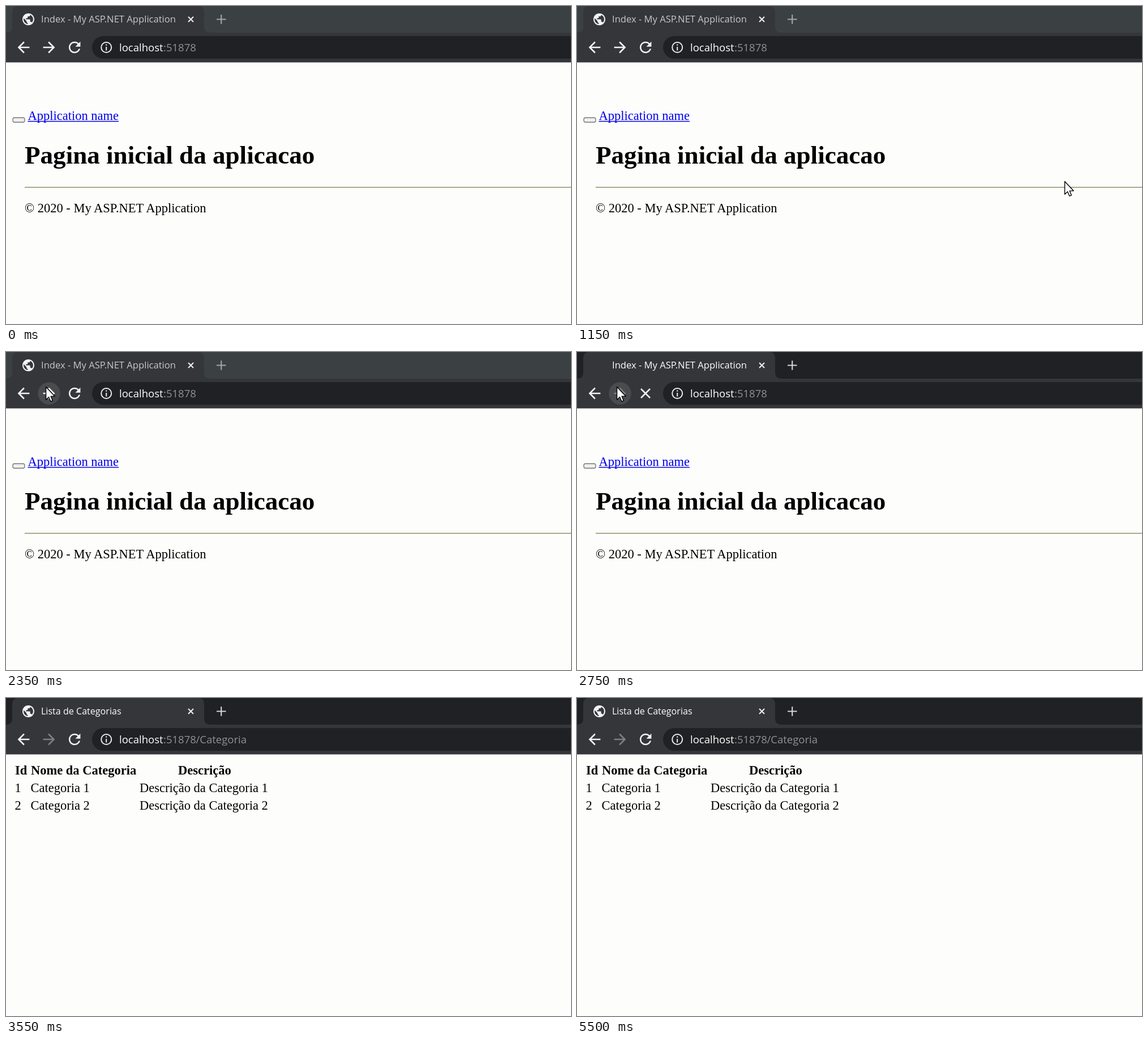
An HTML page for the animation above (5750 ms loop, 998 px wide and 561 px high).

```html
<!DOCTYPE html>
<html lang="pt">
<head>
<meta charset="utf-8">
<title>Browser navigation</title>
<style>
html, body { margin: 0; width: 100%; height: 100%; overflow: hidden; background: #fdfdfc; }
svg { display: block; }
.ui { font-family: "Open Sans", "Noto Sans", sans-serif; }
.doc { font-family: "Liberation Serif", "Times New Roman", serif; font-size: 22.5px; }
.bold { font-weight: bold; }
.heading { font-size: 45.1px; }
.line { fill: none; stroke: currentColor; }
#strip { fill: #3b4143; }
#title { fill: #c6c8ca; }
#plus { color: #a3a6a9; }
.active #strip { fill: #202124; }
.active #title { fill: #fff; }
.active #plus { color: #d3d5d7; }
</style>
</head>
<body>
<svg id="stage" width="998" height="561" viewBox="0 0 998 561">
  <g class="ui">
    <rect id="strip" width="998" height="47"/>
    <path fill="#35363a" d="M0 99.6V47Q11 47 11 36V11Q11 0 22 0H339Q350 0 350 11V36Q350 47 361 47H998V99.6Z"/>
    <path id="globe" fill="#f1f3f4" transform="translate(26.9 10.9) scale(1.05)" d="M12 2C6.48 2 2 6.48 2 12s4.48 10 10 10 10-4.48 10-10S17.52 2 12 2zm-1 17.93c-3.95-.49-7-3.85-7-7.93 0-.62.08-1.21.21-1.79L9 15v1c0 1.1.9 2 2 2v1.93zm6.9-2.54c-.26-.81-1-1.39-1.9-1.39h-1v-3c0-.55-.45-1-1-1H8v-2h2c.55 0 1-.45 1-1V7h2c1.1 0 2-.9 2-2v-.41c2.93 1.19 5 4.06 5 7.41 0 2.08-.8 3.97-2.1 5.39z"/>
    <text id="title" x="62" y="29"></text>
    <path class="line" color="#eceeef" stroke-width="2.1" d="M322 19l9 9m0-9l-9 9"/>
    <path id="plus" class="line" stroke-width="2.1" d="M372 23.5h16.5M380.2 15.3v16.5"/>
    <circle id="hover" cx="76" cy="73" r="19.7" fill="#4a4b4f"/>
    <g fill="#f1f3f4">
      <path transform="translate(15.4 57.4) scale(1.3)" d="M20 11H7.83l5.59-5.59L12 4l-8 8 8 8 1.41-1.41L7.83 13H20z"/>
      <path id="forward" transform="translate(91.6 57.4) scale(-1.3 1.3)" d="M20 11H7.83l5.59-5.59L12 4l-8 8 8 8 1.41-1.41L7.83 13H20z"/>
      <path id="reload" transform="translate(105.8 57.6) scale(1.28)" d="M17.65 6.35C16.2 4.9 14.21 4 12 4c-4.42 0-7.99 3.58-7.99 8s3.57 8 7.99 8c3.73 0 6.84-2.55 7.73-6h-2.08c-.82 2.33-3.04 4-5.65 4-3.31 0-6-2.69-6-6s2.69-6 6-6c1.66 0 3.14.69 4.22 1.78L13 11h7V4z"/>
    </g>
    <path id="stop" class="line" color="#f1f3f4" stroke-width="2.5" d="M113 65l16 16m0-16l-16 16"/>
    <path fill="#202124" d="M998 53H172a20 20 0 0 0 0 40H998Z"/>
    <g class="line" color="#e8eaed" stroke-width="2">
      <circle cx="177.2" cy="73" r="9"/>
      <path d="M177.2 67.5v2.3m0 2.2v6.5"/>
    </g>
    <text y="80" font-size="18.5" fill="#8e9196"><tspan x="200" fill="#fff">localhost</tspan><tspan x="278">:51878</tspan><tspan id="route" x="335.5">/Categoria</tspan></text>
  </g>

  <g id="home" class="doc">
    <rect x="12" y="197" width="21" height="8" rx="3" fill="#efefef" stroke="#767676" stroke-width="1.3"/>
    <text x="38.5" y="201" fill="#0000ee">Application name</text>
    <path d="M38.5 203.5H199" stroke="#0000ee" stroke-width="1.4"/>
    <text class="bold heading" x="33" y="278">Pagina inicial da aplicacao</text>
    <path d="M33 319.5H998" stroke="#96967a"/>
    <path d="M33 320.5H998" stroke="#bcbc9c"/>
    <text x="33" y="364">© 2020 - My ASP.NET Application</text>
  </g>

  <g id="list" class="doc">
    <g class="bold">
      <text x="16" y="135">Id</text>
      <text x="44" y="135">Nome da Categoria</text>
      <text x="304" y="135">Descrição</text>
    </g>
    <text y="166"><tspan x="15.5">1</tspan><tspan x="43.5">Categoria 1</tspan><tspan x="236">Descrição da Categoria 1</tspan></text>
    <text y="197"><tspan x="15.5">2</tspan><tspan x="43.5">Categoria 2</tspan><tspan x="236">Descrição da Categoria 2</tspan></text>
  </g>

  <path id="cursor" fill="#fff" stroke="#000" stroke-linejoin="round" d="M.4.4V16.6L4 13.2 6.4 18.7 8.8 17.7 6.5 12.2H11.5Z"/>
</svg>
<script>
const LOOP = 5750, STEP = 50;
const el = id => document.getElementById(id);
const show = (id, on) => el(id).setAttribute("visibility", on ? "visible" : "hidden");

// Pointer path: time, x, y
const path = [
  [1050, 990, 381], [1100, 940, 350], [1150, 861, 309], [1200, 705, 258],
  [1300, 470, 180], [1450, 270, 115], [1650, 175, 88], [1850, 159, 83],
  [1950, 159, 83], [2100, 110, 68], [2250, 70, 61], [3000, 70, 61],
  [3050, 95, 75], [3150, 169, 114], [3200, 300, 172], [3300, 640, 305],
  [3400, 900, 378], [3450, 960, 389]
];

function pointer(t) {
  const i = path.findIndex(p => p[0] >= t);
  if (i < 0 || t < path[0][0]) return null;
  const b = path[i], a = path[Math.max(0, i - 1)];
  const k = b === a ? 1 : (t - a[0]) / (b[0] - a[0]);
  return [a[1] + (b[1] - a[1]) * k, a[2] + (b[2] - a[2]) * k];
}

function draw(now) {
  const t = Math.floor(now % LOOP / STEP) * STEP;
  const loading = t >= 2600 && t < 2900;
  const listed = t >= 2900;

  el("stage").classList.toggle("active", t >= 2450);
  el("title").textContent = listed ? "Lista de Categorias" : "Index - My ASP.NET Application";
  el("title").setAttribute("font-size", listed ? 16.1 : 16.6);
  show("globe", !loading);
  show("reload", !loading);
  show("stop", loading);
  show("route", listed);
  show("home", !listed);
  show("list", listed);
  el("forward").setAttribute("fill", t >= 2600 ? "#7d7f82" : "#f1f3f4");

  const fadeIn = (t - 2100) / 150, fadeOut = (3300 - t) / 150;
  el("hover").setAttribute("opacity", Math.max(0, Math.min(1, fadeIn, fadeOut)));

  const p = pointer(t);
  show("cursor", p);
  if (p) el("cursor").setAttribute("transform", `translate(${p}) scale(1.4)`);
}

const start = performance.now();
function tick() {
  draw(performance.now() - start);
  requestAnimationFrame(tick);
}
tick();
</script>
</body>
</html>
```
